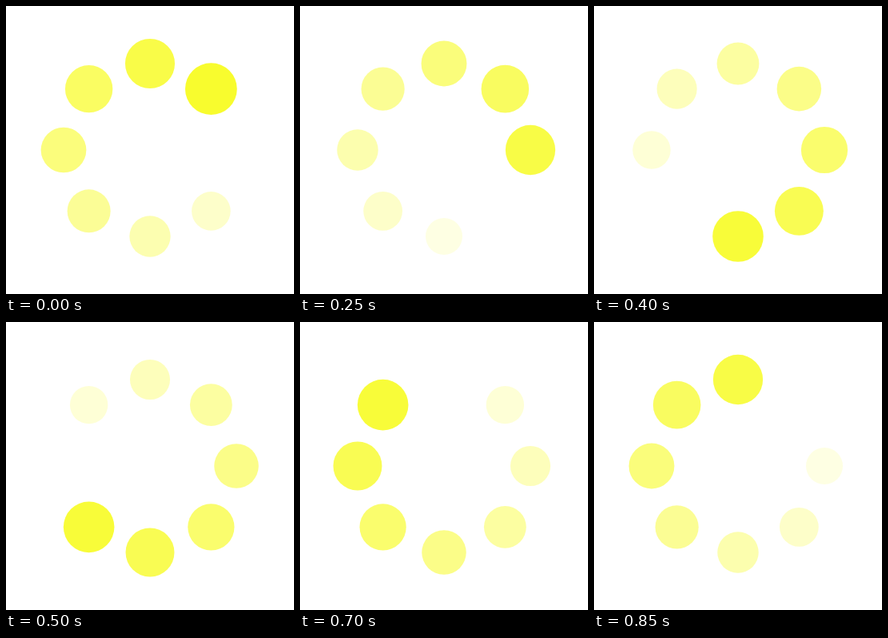
Animation, 360 px wide and 360 px high, one loop 900 ms. Source, as an HTML page with a canvas:

```html
<!DOCTYPE html>
<html lang="en">
<head>
<meta charset="utf-8">
<title>Loading</title>
<style>
html, body { margin: 0; width: 100%; height: 100%; overflow: hidden; background: #fff; }
canvas { display: block; width: 360px; height: 360px; }
</style>
</head>
<body>
<canvas id="stage" width="360" height="360"></canvas>
<script>
const ctx = document.getElementById('stage').getContext('2d');
const SIZE = 360, MID = SIZE / 2, RING = 108, DOT = 21.6;
const LOOP = 900, STEP = 50, COUNT = 8;
const LAG = 0.008;   // the turn runs slightly behind the step clock
const FADED = 0.87;  // dots older than this are too pale to show

ctx.fillStyle = '#f8fc2e';

// Each dot shrinks and fades over one turn, then restarts at full size
function dot(i, turn) {
  const age = (turn - i / COUNT + 1) % 1;
  if (age > FADED) return;
  const angle = (i - 1) * Math.PI / 4;
  ctx.globalAlpha = 1 - age;
  ctx.beginPath();
  ctx.arc(MID + RING * Math.cos(angle), MID + RING * Math.sin(angle),
    DOT * (1.5 - age / 2), 0, Math.PI * 2);
  ctx.fill();
}

// The first step is held, then the turn advances by a sixteenth per step
function draw(time) {
  const step = Math.floor(time % LOOP / STEP);
  const turn = Math.max(0, (step - 1) / 16 - LAG);
  ctx.clearRect(0, 0, SIZE, SIZE);
  for (let i = 0; i < COUNT; i++) dot(i, turn);
}

const start = performance.now();
function tick() {
  draw(performance.now() - start);
  requestAnimationFrame(tick);
}
tick();
</script>
</body>
</html>
```
